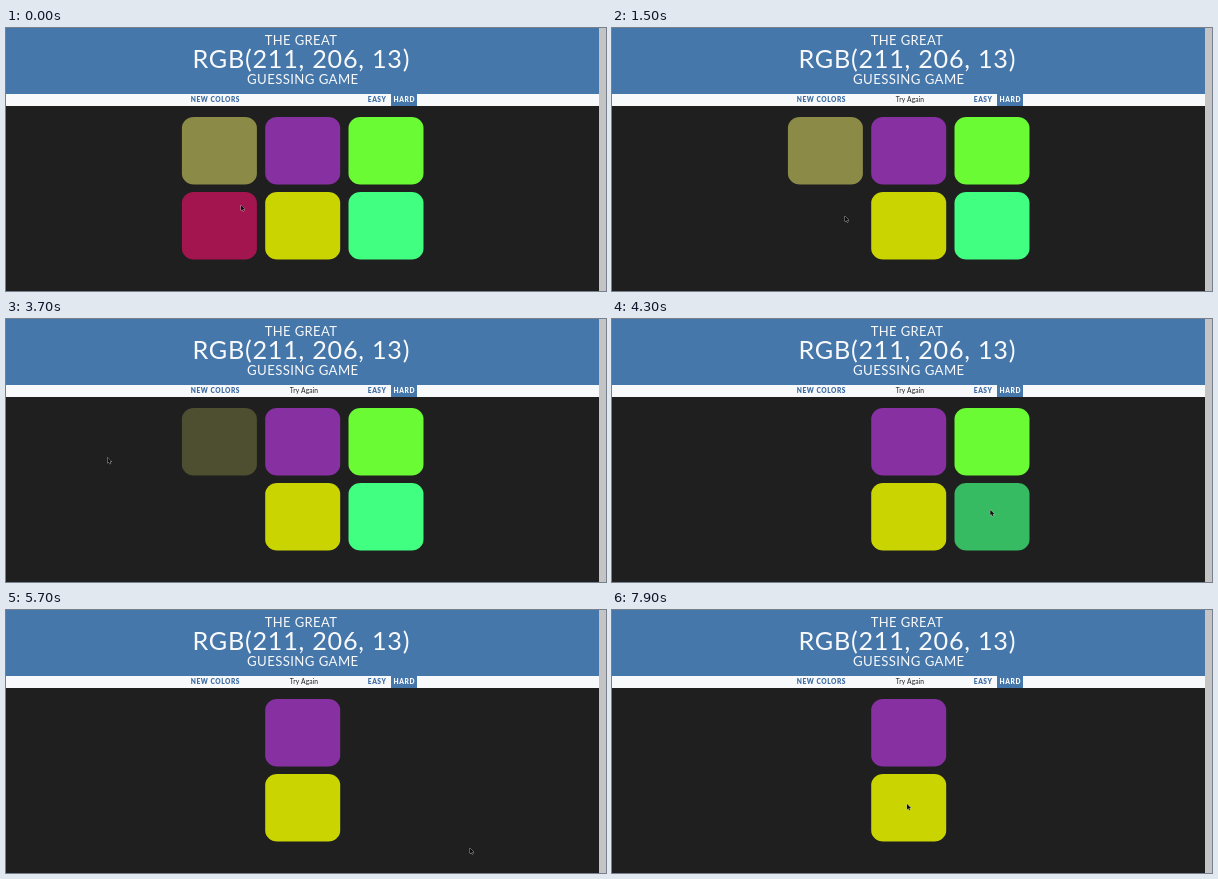
An HTML page with a canvas that plays this animation: 600 px wide and 263 px high, repeating every 8000 ms.

```html
<!DOCTYPE html>
<html lang="en">
<head>
<meta charset="utf-8">
<title>Colour guessing game</title>
<style>
html, body { margin: 0; width: 100%; height: 100%; overflow: hidden; background: #1f1f1f; }
canvas { display: block; width: 600px; height: 263px; }
</style>
</head>
<body>
<canvas id="stage"></canvas>
<script>
const W = 600, H = 263, PAGE = 593, LOOP = 8000, STEP = 100, FADE = 600;
const NAV_TOP = 66, NAV_H = 12;
const BLUE = '#4577aa', LINK = '#3b6ca3', WHITE = '#f8f9fb', DARK = '#1f1f1f';
const canvas = document.getElementById('stage');
const ctx = canvas.getContext('2d');
const dpr = window.devicePixelRatio || 1;
canvas.width = W * dpr;
canvas.height = H * dpr;

// tiles in reading order; guess is the time of a wrong click
const tiles = [
  { color: '#8b8a46', guess: 3500 },
  { color: '#8730a2' },
  { color: '#6bfb35', guess: 4780 },
  { color: '#a3154f', guess: 600 },
  { color: '#c9d400' },
  { color: '#41ff80', guess: 4200 }
];
const firstGuess = Math.min(...tiles.map(tile => tile.guess ?? Infinity));

// pointer stops
const stops = [
  { t: 0, x: 235, y: 177 },
  { t: 1500, x: 233, y: 188 },
  { t: 2700, x: 328, y: 67 },
  { t: 3500, x: 212, y: 126 },
  { t: 3800, x: 63, y: 143 },
  { t: 4200, x: 378, y: 197 },
  { t: 4800, x: 383, y: 115 },
  { t: 5500, x: 464, y: 238 },
  { t: 5700, x: 464, y: 238 },
  { t: 6900, x: 295, y: 194 }
];

const ease = p => p * p * (3 - 2 * p);
const mix = (a, b, p) => a + (b - a) * p;
const clamp = v => Math.max(0, Math.min(1, v));

function pointerAt(t) {
  const i = stops.findLastIndex(s => s.t <= t);
  const a = stops[i], b = stops[i + 1] ?? a;
  const p = b === a ? 0 : ease((t - a.t) / (b.t - a.t));
  return [mix(a.x, b.x, p), mix(a.y, b.y, p)];
}

function rect(x, y, w, h, color) {
  ctx.fillStyle = color;
  ctx.fillRect(x, y, w, h);
}

function text(str, x, y, size, color, { weight = 400, align = 'center', spacing = 0 } = {}) {
  ctx.font = `${weight} ${size}px Lato, "Open Sans", sans-serif`;
  ctx.letterSpacing = spacing + 'px';
  ctx.textAlign = align;
  ctx.fillStyle = color;
  ctx.fillText(str, x, y);
}

function title(str, x, y, size) {
  text(str, x, y, size, WHITE, { spacing: size * 0.03 });
}

function link(str, x, color = LINK) {
  text(str, x, 74, 6.6, color, { weight: 900, align: 'left', spacing: 0.55 });
}

function drawTile({ color, guess = Infinity }, i, t) {
  // fast start, slow finish
  const alpha = Math.pow(1 - clamp((t - guess) / FADE), 2);
  if (!alpha) return;
  const col = i % 3, row = Math.floor(i / 3);
  ctx.globalAlpha = alpha;
  ctx.fillStyle = color;
  ctx.beginPath();
  ctx.roundRect(175.9 + col * 83.3, 89 + row * 75, 75, 67.5, { x: 12, y: 11 });
  ctx.fill();
  ctx.globalAlpha = 1;
}

function drawPointer(x, y) {
  ctx.save();
  ctx.translate(x, y);
  ctx.scale(0.9, 0.9);
  ctx.lineJoin = 'round';
  ctx.lineWidth = 0.9;
  ctx.strokeStyle = '#c4c4c4';
  ctx.fillStyle = '#0c0c0c';
  const arrow = new Path2D('M0 0V6L1.4 4.8 2.4 7 3.4 6.6 2.5 4.4H4.4Z');
  ctx.stroke(arrow);
  ctx.fill(arrow);
  ctx.restore();
}

function draw(t) {
  ctx.setTransform(dpr, 0, 0, dpr, 0, 0);
  rect(0, 0, W, H, DARK);
  rect(0, 0, PAGE, NAV_TOP, BLUE);
  rect(0, NAV_TOP, PAGE, NAV_H, WHITE);
  rect(PAGE, 0, W - PAGE, H, '#c4c4c4');

  title('THE GREAT', 295, 16.5, 13);
  title('RGB(211, 206, 13)', 295.3, 40.4, 25.2);
  title('GUESSING GAME', 296.8, 56, 13.2);

  link('NEW COLORS', 184.8);
  link('EASY', 361.8);
  rect(385, NAV_TOP, 26, NAV_H, BLUE);
  link('HARD', 387.6, WHITE);
  if (t >= firstGuess) text('Try Again', 298, 74, 6.7, '#222', { spacing: 0.1 });

  tiles.forEach((tile, i) => drawTile(tile, i, t));
  drawPointer(...pointerAt(t));
}

function tick() {
  draw(Math.floor((performance.now() % LOOP) / STEP) * STEP);
  requestAnimationFrame(tick);
}
tick();
</script>
</body>
</html>
```
